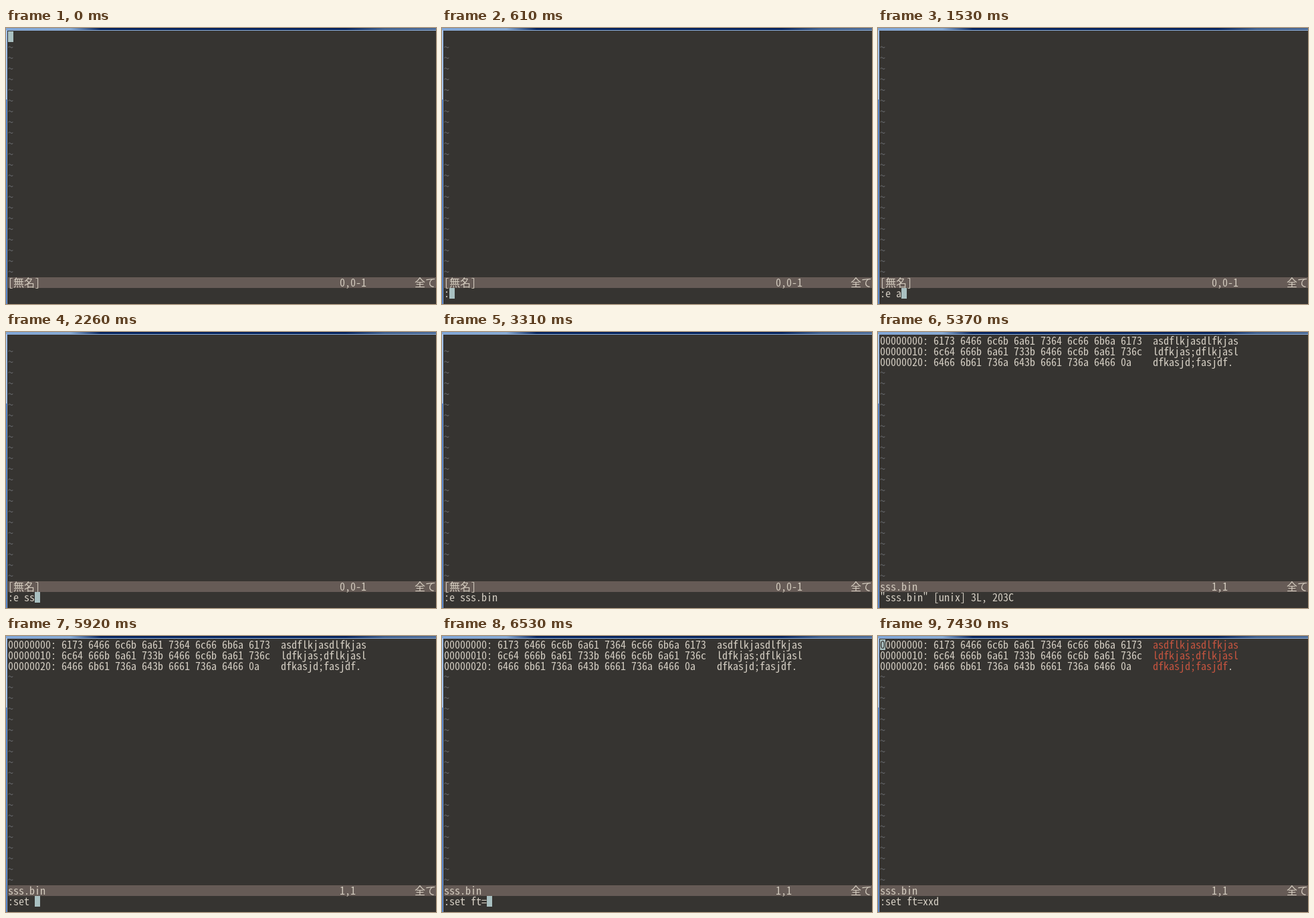
Write an HTML page that moves like this. It is 643 px wide and 413 px high and loops after 8000 ms.

```html
<!DOCTYPE html>
<html lang="ja">
<head>
<meta charset="utf-8">
<title>Editor session</title>
<style>
html, body { margin: 0; width: 100%; height: 100%; overflow: hidden; background: #363431; }
svg { display: block; width: 643px; height: 413px; }
text {
  font: 16px "Noto Sans Mono CJK JP", "Noto Sans Mono", "DejaVu Sans Mono", monospace;
  letter-spacing: calc(8px - 1ch);
  white-space: pre;
  fill: #d3cdc2;
}
.wide { font-family: "Noto Sans Mono CJK JP", "Noto Sans CJK JP", "Noto Sans CJK", sans-serif; letter-spacing: 0; }
.bar text { fill: #d2cabd; }
.tilde { fill: #65676a; }
.under { fill: #363431; }
.lit .ascii { fill: #c4543f; }
</style>
</head>
<body>
<svg viewBox="0 0 643 413" xmlns="http://www.w3.org/2000/svg">
  <defs>
    <linearGradient id="sky">
      <stop offset="0" stop-color="#7fa5d6"/>
      <stop offset=".15" stop-color="#86a9d2"/>
      <stop offset=".22" stop-color="#04225c"/>
      <stop offset=".79" stop-color="#04225c"/>
      <stop offset=".88" stop-color="#3f5f8d"/>
      <stop offset="1" stop-color="#4d6c98"/>
    </linearGradient>
  </defs>
  <rect width="643" height="413" fill="#363431"/>
  <rect width="643" height="3" fill="url(#sky)"/>
  <rect y="3" width="643" height="1" fill="#8fb0dc"/>
  <rect y="3" width="1" height="104" fill="#b4cdea"/>
  <rect y="107" width="1" height="306" fill="#2f63b4"/>
  <rect x="1" y="3" width="1" height="410" fill="#8fb3e6"/>
  <rect x="3" y="373" width="640" height="16" fill="#665b56"/>
  <g id="tildes"></g>
  <g id="blank" class="bar"></g>
  <g id="file"></g>
  <g id="fileBar" class="bar"></g>
  <g id="live"></g>
</svg>
<script>
const LOOP = 8000, STATUS = 23, CMD = 24;
const $ = id => document.getElementById(id);

function make(tag, parent, attrs) {
  const el = document.createElementNS('http://www.w3.org/2000/svg', tag);
  for (const k in attrs) el.setAttribute(k, attrs[k]);
  return parent.appendChild(el);
}
const cellX = col => 3 + col * 8;
const cellY = row => 5 + row * 16;

function put(group, col, row, str, cls = '') {
  const el = make('text', group, { x: cellX(col), y: cellY(row) + 14, class: cls });
  el.textContent = str;
  return el;
}

const dump = [
  ['00000000: 6173 6466 6c6b 6a61 7364 6c66 6b6a 6173', 'asdflkjasdlfkjas'],
  ['00000010: 6c64 666b 6a61 733b 6466 6c6b 6a61 736c', 'ldfkjas;dflkjasl'],
  ['00000020: 6466 6b61 736a 643b 6661 736a 6466 0a', 'dfkasjd;fasjdf']
];

const tildes = [];
for (let row = 1; row < STATUS; row++) tildes.push(put($('tildes'), 0, row, '~', 'tilde'));

put($('blank'), 0, STATUS, '[');
put($('blank'), 1, STATUS, '無名', 'wide');
put($('blank'), 5, STATUS, ']');
put($('blank'), 62, STATUS, '0,0-1');

dump.forEach(([hex, ascii], row) => {
  put($('file'), 0, row, hex);
  put($('file'), 51, row, ascii, 'ascii');
});
put($('file'), 65, 2, '.');
put($('fileBar'), 0, STATUS, 'sss.bin');
const ruler = put($('fileBar'), 62, STATUS, '');

const bar = make('g', $('live'), { class: 'bar' });
put(bar, 76, STATUS, '全て', 'wide');
const command = put($('live'), 0, CMD, '');
const cursor = make('g', $('live'), {});
const block = make('rect', cursor, { width: 8, height: 16, fill: '#a9c0c1' });
const under = put(cursor, 0, 0, '', 'under');

// Each step: start time, command line, cursor column in the buffer,
// 'cmd' for the command line, or null when hidden.
const info = '"sss.bin" [unix] 3L, 203C';
const steps = [
  [0, '', 0], [120, '', null], [360, '', 0],
  [610, ':', 'cmd'], [850, ':e', 'cmd'], [970, ':e ', 'cmd'],
  [1530, ':e a', 'cmd'], [2020, ':e ', 'cmd'], [2140, ':e s', 'cmd'],
  [2260, ':e ss', 'cmd'], [2440, ':e sss', 'cmd'], [2620, ':e sss.bin', 'cmd'],
  [3310, ':e sss.bin', null], [3430, info, null], [3490, info, 12],
  [4140, info, null], [4450, info, 12], [4690, info, 0], [5370, info, null],
  [5430, ':', 'cmd'], [5800, ':se', 'cmd'], [5920, ':set ', 'cmd'],
  [6100, ':set f', 'cmd'], [6280, ':set ft', 'cmd'], [6530, ':set ft=', 'cmd'],
  [6770, ':set ft=x', 'cmd'], [6950, ':set ft=xx', 'cmd'], [7130, ':set ft=xxd', 'cmd'],
  [7370, ':set ft=xxd', null], [7430, ':set ft=xxd', 0]
];

const show = (el, on) => el.setAttribute('visibility', on ? 'visible' : 'hidden');

function placeCursor(at, cmd, loaded) {
  show(cursor, at !== null);
  if (at === null) return;
  const typing = at === 'cmd';
  const col = typing ? cmd.length : at;
  const row = typing ? CMD : 0;
  block.setAttribute('x', cellX(col));
  block.setAttribute('y', cellY(row));
  under.setAttribute('x', cellX(col));
  under.setAttribute('y', cellY(row) + 14);
  under.textContent = loaded && !typing ? dump[0][0][col] : '';
}

let last;
function draw() {
  const t = performance.now() % LOOP;
  const step = steps.findLast(s => s[0] <= t);
  if (step !== last) {
    last = step;
    const [start, cmd, at] = step;
    const loaded = start >= 3430;
    show($('blank'), !loaded);
    show($('file'), loaded);
    show($('fileBar'), loaded);
    tildes.slice(0, 2).forEach(el => show(el, !loaded));
    $('file').classList.toggle('lit', start >= 7430);
    ruler.textContent = start >= 4690 ? '1,1' : '1,13';
    command.textContent = cmd;
    placeCursor(at, cmd, loaded);
  }
  requestAnimationFrame(draw);
}
draw();
</script>
</body>
</html>
```
